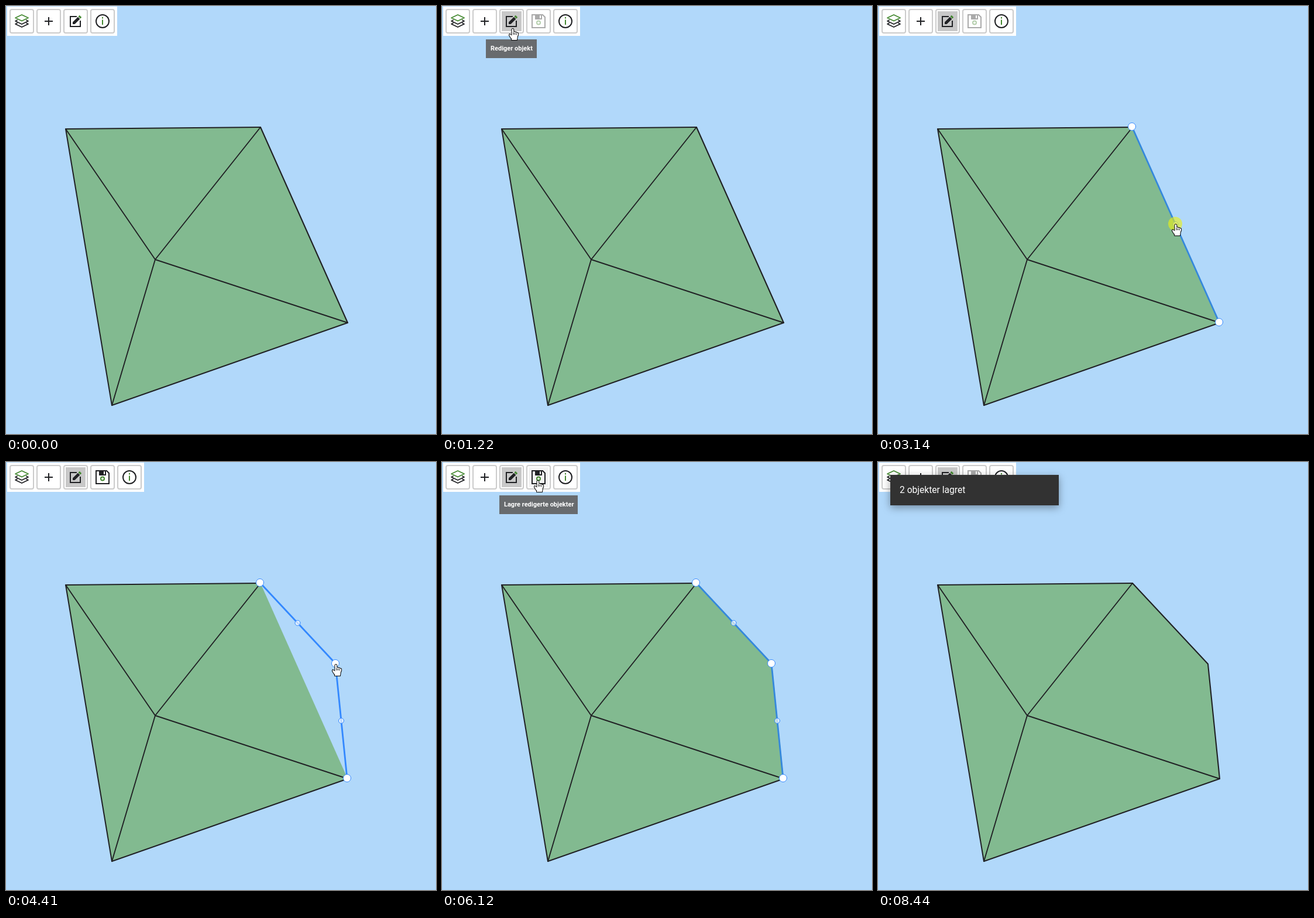
An HTML page with a canvas that plays this animation: 735x731 px, repeating every 9.04 s.

```html
<!DOCTYPE html>
<html lang="no">
<head>
<meta charset="utf-8">
<title>Rediger objekt</title>
<style>
html, body { margin: 0; width: 100%; height: 100%; overflow: hidden; background: #b1d8fa; }
canvas { display: block; }
</style>
</head>
<body>
<canvas id="stage" width="735" height="731"></canvas>
<script>
const ctx = document.getElementById('stage').getContext('2d');
const LOOP = 9040, TICK = 70;
const INK = '#202124', GREEN = '#43882f', BLUE = '#3388ff', SKY = '#b1d8fa', FILL = '#82ba90';

// Corners of the shape, its peak, and the dragged vertex before and after
const A = [102, 210], B = [435, 207], C = [584, 541], D = [181, 682], PEAK = [255, 433];
const MID = [509, 372], OUT = [564, 345];
const ENTRY = [701, 661], EXIT = [745, 716], EDIT = [121, 38], SAVE = [164, 31];

const lerp = (p, q, k) => [p[0] + (q[0] - p[0]) * k, p[1] + (q[1] - p[1]) * k];
const EDGE = lerp(B, C, .335);

const moves = [
  { start: 200, end: 880, to: EDIT, bend: [400, 260] },
  { start: 1280, end: 1770, to: EDGE, bend: [540, 170] },
  { start: 2500, end: 2920, to: MID },
  { start: 3944, end: 4210, to: OUT },
  { start: 5070, end: 5910, to: SAVE, bend: [370, 140] },
  { start: 7540, end: 8170, to: EXIT, bend: [760, 60] }
];
const drag = moves[3];

const within = (t, a, b) => t >= a && t < b;
const ease = k => k * k * (3 - 2 * k);

function progress(t, a, b) {
  if (t >= b) return 1;
  return Math.max(0, Math.floor((t - a) / TICK) * TICK / (b - a));
}

function trace(points, close) {
  ctx.beginPath();
  points.forEach(p => ctx.lineTo(p[0], p[1]));
  if (close) ctx.closePath();
}

function line(points, color, width, close) {
  trace(points, close);
  ctx.strokeStyle = color;
  ctx.lineWidth = width;
  ctx.stroke();
}

function area(points, color) {
  trace(points, true);
  ctx.fillStyle = color;
  ctx.fill();
}

function circle(x, y, r, fill, stroke, width) {
  ctx.beginPath();
  ctx.arc(x, y, r, 0, Math.PI * 2);
  if (fill) { ctx.fillStyle = fill; ctx.fill(); }
  if (stroke) { ctx.strokeStyle = stroke; ctx.lineWidth = width; ctx.stroke(); }
}

function rect(x, y, w, h, color) {
  ctx.fillStyle = color;
  ctx.fillRect(x, y, w, h);
}

function text(str, x, y, font) {
  ctx.font = font + ' Roboto, sans-serif';
  ctx.fillStyle = '#fff';
  ctx.fillText(str, x, y);
}

function pointer(t) {
  let pos = ENTRY;
  for (const { start, end, to, bend } of moves) {
    if (t < start) break;
    const k = ease(progress(t, start, end));
    const via = bend || lerp(pos, to, .5);
    pos = lerp(lerp(pos, via, k), lerp(via, to, k), k);
  }
  return pos;
}

function handle([x, y], small) {
  circle(x, y, small ? 4.5 : 6.5, small ? 'rgba(255,255,255,.65)' : '#fff', BLUE, 1);
}

function drawShape(t) {
  const split = t >= 3470, saved = t >= 4610;
  const vertex = lerp(MID, OUT, ease(progress(t, drag.start, drag.end)));
  const edge = split ? [B, vertex, C] : [B, C];
  area(saved ? [A, B, OUT, C, D] : [A, B, C, D], FILL);
  ctx.lineJoin = ctx.lineCap = 'round';
  line([C, D, A, B], INK, 2);
  [A, B, C, D].forEach(p => line([PEAK, p], INK, 1.9));
  if (!within(t, 1770, 6250)) {
    line(edge, INK, 2.1);
    return;
  }
  const marks = edge.map(p => [p[0] - 1, p[1] - 1]);
  line(marks, split && !saved ? BLUE : '#3588dc', 2.8);
  if (t < 2150) return;
  for (let i = 1; i < marks.length; i++) handle(lerp(marks[i - 1], marks[i], .5), true);
  marks.forEach(p => handle(p));
}

function button(i, fill) {
  const x = 6 + i * 46;
  ctx.beginPath();
  ctx.roundRect(x + 1, 6, 40, 40, 3);
  ctx.fillStyle = '#fff';
  ctx.fill();
  ctx.strokeStyle = '#cbcbcb';
  ctx.lineWidth = 2;
  ctx.stroke();
  if (fill) rect(x + 4, 9, 34, 34, fill);
}

function layersIcon() {
  line([[27, 15], [38, 20.3], [27, 25.6], [16, 20.3]], GREEN, 1.7, true);
  for (const y of [25.7, 30.7]) {
    line([[19, y - 1.4], [16, y], [27, y + 5.3], [38, y], [35, y - 1.4]], INK, 1.8);
  }
}

function plusIcon() {
  rect(66, 25, 14, 2, INK);
  rect(72, 19, 2, 14, INK);
}

function editIcon() {
  ctx.lineJoin = 'miter';
  ctx.lineCap = 'butt';
  line([[121, 18], [110, 18], [110, 35], [127, 35], [127, 25]], INK, 2);
  // Pencil, drawn along its own axis
  ctx.save();
  ctx.translate(114, 31);
  ctx.rotate(-Math.PI / 4);
  area([[0, 0], [2.5, -2.5], [15, -2.5], [15, 2.5], [2.5, 2.5]], INK);
  rect(16, -2.5, 3, 5, GREEN);
  ctx.restore();
}

function infoIcon(x) {
  circle(x, 26, 11, null, INK, 2);
  rect(x - 1, 19, 2, 2.4, GREEN);
  rect(x - 1, 23.5, 2, 8.5, GREEN);
}

function saveIcon(on, back) {
  const ink = on ? INK : '#aaaaaa';
  line([[154, 15], [172, 15], [176, 19], [176, 37], [154, 37]], ink, 2, true);
  rect(159, 14, 12, 9, ink);
  rect(167, 16, 2, 5, back);
  circle(165, 28.5, 3, null, on ? GREEN : '#b5cfad', 2);
}

function spinner(t) {
  const count = 10, pitch = Math.PI * 2 / count;
  const turn = Math.floor((t - 7540) / 74) * .3;
  ctx.lineWidth = 3;
  for (let i = 0; i < count; i++) {
    const a = (i + .3) * pitch + turn;
    ctx.beginPath();
    ctx.arc(165, 26, 10.4, a - pitch * .32, a + pitch * .32);
    ctx.strokeStyle = i === 4 ? GREEN : INK;
    ctx.stroke();
  }
}

function drawToolbar(t) {
  const editing = t >= 1160, last = editing ? 4 : 3;
  const hover = '#f3f3f3';
  const saveBack = within(t, 5880, 7640) ? hover : '#fff';
  rect(2, 1, 52 + last * 46 - 2 + (editing ? 0 : 0), 50, '#fff');
  button(0);
  layersIcon();
  button(1);
  plusIcon();
  button(2, editing ? '#c8c8c8' : within(t, 870, 1160) && hover);
  editIcon();
  if (editing) {
    button(3, saveBack);
    if (within(t, 6250, 7690)) spinner(t);
    else saveIcon(within(t, 3470, 6250), saveBack);
  }
  button(last);
  infoIcon(27 + last * 46);
}

function tooltip(str, x, w) {
  rect(x, 57, w, 32, '#686b6e');
  text(str, x + 8, 76, '700 11px');
}

function toast(t) {
  const k = progress(t, 7620, 7830), s = .8 + .2 * k;
  if (!k) return;
  ctx.save();
  ctx.globalAlpha = k;
  ctx.translate(165, 48);
  ctx.scale(s, s);
  ctx.shadowColor = 'rgba(0,0,0,.36)';
  ctx.shadowBlur = 13;
  ctx.shadowOffsetY = 4;
  rect(-144, -26, 288, 52, '#323232');
  ctx.shadowColor = 'transparent';
  text('2 objekter lagret', -128, 5, '400 15.6px');
  ctx.restore();
}

function arrow() {
  const p = [[.5, .5], [.5, 16.5], [4, 13], [6.7, 19.2], [9, 18.2], [6.4, 12.2], [11.5, 12.2]];
  area(p, '#fff');
  line(p, '#000', 1, true);
}

function hand() {
  const knuckle = i => i ? 5 + i * .9 : 1;
  // Thumb, palm and four fingers joined into one outline
  trace([[-5.5, 10], [-2, 12], [0, 18], [-3, 17], [-6, 12]], true);
  ctx.moveTo(-1.5, 9);
  ctx.lineTo(8.7, 9);
  ctx.lineTo(7, 20);
  ctx.lineTo(-2, 20);
  ctx.closePath();
  for (let i = 0; i < 4; i++) ctx.roundRect(-1.5 + i * 2.6, knuckle(i), 2.8, 13 - knuckle(i), 1.4);
  ctx.strokeStyle = '#000';
  ctx.lineWidth = 2;
  ctx.stroke();
  ctx.fillStyle = '#fff';
  ctx.fill();
  for (let i = 1; i < 4; i++) {
    const x = -1.4 + i * 2.6;
    line([[x, knuckle(i) + 1], [x, 11]], '#000', 1);
  }
}

function drawPointer(t) {
  if (!within(t, 200, 8170)) return;
  const [x, y] = pointer(t);
  const pressed = within(t, 1010, 1160) || within(t, 2020, 2220) || within(t, 3140, 3270) ||
    within(t, 4010, 4410) || within(t, 6180, 6250);
  const pointing = within(t, 870, 1340) || within(t, 1740, 5140) || within(t, 5880, 6250);
  if (pressed) circle(x - 1, y, 12, 'rgba(236,240,20,.62)');
  ctx.save();
  ctx.translate(x, y);
  ctx.lineJoin = 'round';
  if (pointing) hand();
  else arrow();
  ctx.restore();
}

function draw(t) {
  rect(0, 0, 735, 731, SKY);
  drawShape(t);
  drawToolbar(t);
  if (within(t, 940, 1350)) tooltip('Rediger objekt', 75, 87);
  if (within(t, 6050, 7640)) tooltip('Lagre redigerte objekter', 98, 134);
  toast(t);
  drawPointer(t);
}

const start = performance.now();
function frame() {
  draw((performance.now() - start) % LOOP);
  requestAnimationFrame(frame);
}
frame();
</script>
</body>
</html>
```
